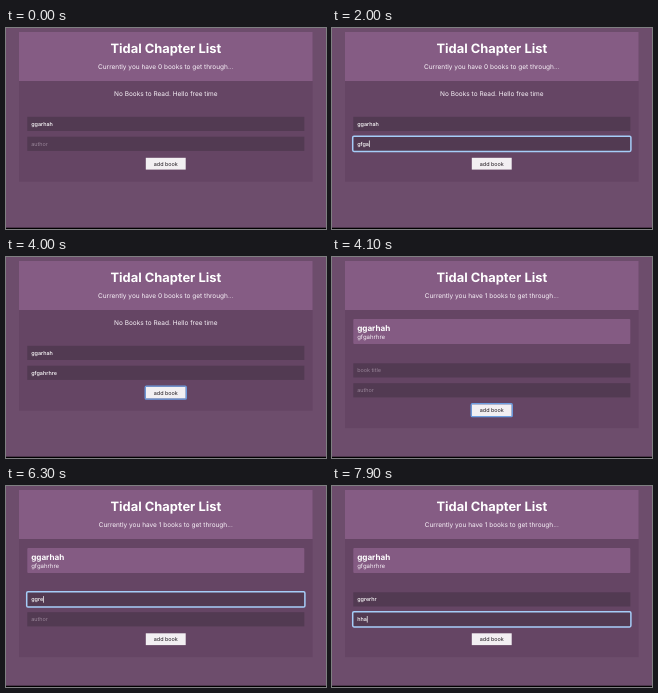
Animation, 320 px wide and 201 px high, one loop 8000 ms. Source, as an HTML page:

```html
<!DOCTYPE html>
<html lang="en">
<head>
<meta charset="utf-8">
<title>Reading list</title>
<style>
  html, body { margin: 0; width: 100%; height: 100%; overflow: hidden; background: #6d4d6c; }
  svg { display: block; width: 100vw; height: 100vh; }
  text {
    font-family: Inter, "Open Sans", sans-serif; font-size: 6.5px; fill: #f8f2f8;
    text-rendering: geometricPrecision;
  }
  .mid { text-anchor: middle; }
  .heading { font-size: 12.9px; font-weight: 700; fill: #fff; }
  .book { font-size: 8.1px; font-weight: 700; fill: #fff; }
  .author { font-size: 6px; }
  .input { font-size: 5.45px; font-weight: 500; fill: #fff; }
  .input.empty { font-weight: 400; fill: #988498; }
  .label { font-size: 5.45px; fill: #1d171d; }
  .field { fill: #523a52; }
  .ring { fill: none; stroke: #a5cdf8; stroke-width: 1.5; }
  .button-ring { fill: none; stroke: #6c9ee2; stroke-width: 1.3; }
  .caret { fill: #fff; }
</style>
</head>
<body>
<svg viewBox="0 0 320 201" preserveAspectRatio="none">
  <rect width="320" height="201" fill="#6d4d6c"/>
  <rect id="panel" x="13" y="4" width="293.6" height="149.7" fill="#654564"/>
  <rect x="13" y="4" width="293.6" height="49" fill="#855c84"/>
  <text class="mid heading" x="159.8" y="25">Tidal Chapter List</text>
  <text class="mid" id="summary" x="159.8" y="41"></text>
  <text class="mid" id="none" x="159.8" y="68.2">No Books to Read. Hello free time</text>
  <g id="entry">
    <rect x="21.3" y="62" width="277" height="25" rx="1" fill="#845b83"/>
    <text class="book" x="25.2" y="74">ggarhah</text>
    <text class="author" x="25.2" y="81.7">gfgahrhre</text>
  </g>
  <g id="form">
    <g id="title"></g>
    <g id="author"></g>
    <rect x="139.8" y="129.8" width="39.9" height="11.8" fill="#f2eff2"/>
    <rect id="buttonRing" class="button-ring" x="139.2" y="129.2" width="41.1" height="13" rx="1.2"/>
    <text class="mid label" x="159.8" y="137.6">add book</text>
  </g>
  <rect y="199.7" width="320" height="1.3" fill="#000"/>
</svg>
<script>
const LOOP = 8000;
const ADD_TIME = 4100;
const FORM_SHIFT = 17.5;
const TEXT_LEFT = 25.2;
const $ = id => document.getElementById(id);

// Each track lists [start time, value]; values hold until the next entry.
const titleTrack = [
  [0, 'ggarhah'], [ADD_TIME, ''], [5600, 'g'], [5900, 'gg'], [6200, 'ggr'],
  [6300, 'ggre'], [6500, 'ggrer'], [6600, 'ggrerh'], [6800, 'ggrerhr']
];
const authorTrack = [
  [0, ''], [1800, 'gf'], [2000, 'gfga'], [2300, 'gfgah'], [2400, 'gfgahr'],
  [2700, 'gfgahrh'], [2900, 'gfgahrhr'], [3000, 'gfgahrhre'], [ADD_TIME, ''],
  [7500, 'h'], [7800, 'hh'], [7900, 'hha']
];
const focusTrack = [
  [0, ''], [1100, 'author'], [4000, 'button'], [5400, 'title'], [7400, 'author']
];
const caretTrack = [
  [0, false], [1100, true], [1600, false], [1800, true], [3500, false],
  [5400, true], [7300, false], [7400, true]
];

const valueAt = (track, time) => track.reduce(
  (value, [start, next]) => time >= start ? next : value, track[0][1]);

const show = (node, visible) => node.setAttribute('display', visible ? 'inline' : 'none');

function createField(id, top, placeholder) {
  const group = $(id);
  group.innerHTML = `
    <rect class="field" x="21.3" y="${top}" width="277" height="14.2"/>
    <rect class="ring" x="20.7" y="${top - 0.5}" width="278.2" height="15.2" rx="1.3"/>
    <text class="input" x="${TEXT_LEFT}" y="${top + 9.1}"></text>
    <rect class="caret" y="${top + 3.8}" width="0.7" height="6.6"/>`;
  const [, ring, text, caret] = group.children;
  return (value, focused, caretOn) => {
    text.textContent = value || placeholder;
    text.classList.toggle('empty', !value);
    show(ring, focused);
    show(caret, focused && caretOn);
    caret.setAttribute('x', TEXT_LEFT + (value ? text.getComputedTextLength() : 0));
  };
}

const drawTitle = createField('title', 88.8, 'book title');
const drawAuthor = createField('author', 108.7, 'author');

function render(time) {
  const added = time >= ADD_TIME;
  const focus = valueAt(focusTrack, time);
  const caretOn = valueAt(caretTrack, time);
  const shift = added ? FORM_SHIFT : 0;

  $('summary').textContent = `Currently you have ${added ? 1 : 0} books to get through...`;
  show($('none'), !added);
  show($('entry'), added);
  $('panel').setAttribute('height', 149.7 + shift);
  $('form').setAttribute('transform', `translate(0 ${shift})`);
  drawTitle(valueAt(titleTrack, time), focus === 'title', caretOn);
  drawAuthor(valueAt(authorTrack, time), focus === 'author', caretOn);
  show($('buttonRing'), focus === 'button');
}

const startTime = performance.now();
function tick() {
  render((performance.now() - startTime) % LOOP);
  requestAnimationFrame(tick);
}
tick();
</script>
</body>
</html>
```
